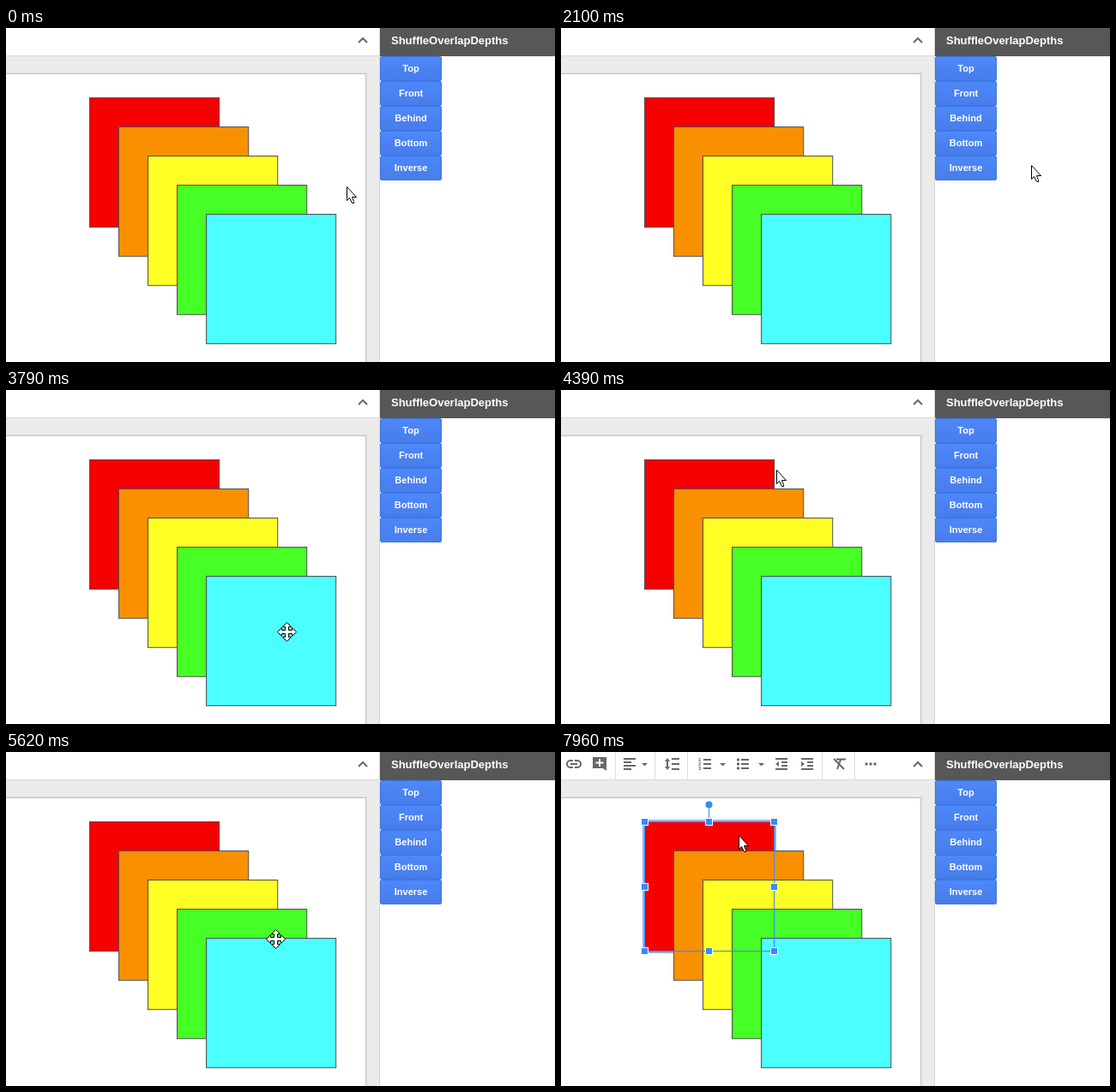
Recreate the animation shown at these times as an HTML page. Size 640 px wide and 390 px high, loop 8 s.

```html
<!DOCTYPE html>
<html lang="en">
<head>
<meta charset="utf-8">
<title>Stacking order panel</title>
<style>
  html, body { margin: 0; width: 100%; height: 100%; overflow: hidden; background: #fff; }
  svg { display: block; width: 640px; height: 390px; font-family: "Liberation Sans", Arial, sans-serif; font-weight: bold; }
  .icon { fill: none; stroke: #686868; stroke-width: 2; }
  .solid { fill: #686868; }
  .digits { font-size: 6px; fill: #686868; }
  .button rect { fill: url(#blue); stroke: #3d78e6; }
  .button.hover rect { fill: url(#blueHover); stroke: #2f5bb7; }
  .button text { font-size: 11px; fill: #fff; text-anchor: middle; }
  .cursor path { fill: #fff; stroke: #000; }
</style>
</head>
<body>
<svg viewBox="0 0 640 390">
  <defs>
    <linearGradient id="blue" x2="0" y2="1"><stop stop-color="#4d88fa"/><stop offset="1" stop-color="#487cea"/></linearGradient>
    <linearGradient id="blueHover" x2="0" y2="1"><stop stop-color="#4d86f7"/><stop offset="1" stop-color="#3570de"/></linearGradient>
  </defs>

  <rect width="640" height="390" fill="#fff"/>
  <rect y="33" width="435" height="357" fill="#ebebeb"/>
  <path d="M0 32.5H435" stroke="#d8d8d8"/>
  <rect x="-5" y="52.5" width="426" height="345" fill="none" stroke="#dedede"/>
  <rect x="-5" y="53.5" width="424.5" height="345" fill="#fff" stroke="#c4c4c4"/>
  <path class="icon" d="M411 17 416 12 421 17"/>

  <g id="toolbar"></g>
  <g id="squares"></g>
  <g id="selection" fill="#378bf7"></g>

  <path d="M435.500 0V390" stroke="#d6d6d6"/>
  <rect x="436" width="204" height="33" fill="#575757"/>
  <text x="449" y="19" font-size="13" fill="#fff">ShuffleOverlapDepths</text>
  <g id="buttons"></g>

  <g class="cursor">
    <path id="arrow" d="M0 0V16L3 13 6 19H8V17L6 12H11Z"/>
    <path id="move" d="M0-11 5-6H2V-2H6V-5L11 0 6 5V2H2V6H5L0 11-5 6H-2V2H-6V5L-11 0-6-5V-2H-2V-6H-5Z"/>
    <path id="hand" d="M-2 1Q0-1 2 1V6Q8 6 10 9V15L8 21H-1L-6 12-4 10-2 12Z"/>
  </g>
</svg>
<script>
const LOOP = 8000, FIRST_MOVE = 670, TICK = 77.34;
const SELECT_TICK = 86, TOOLBAR_TICK = 87, RELEASE_TICK = 90;
const SIZE = 151.2, STEP = 34, BUTTON_STEP = 29;
const colors = ["#f60000", "#f89000", "#ffff24", "#46ff24", "#4cffff"];
const labels = ["Top", "Front", "Behind", "Bottom", "Inverse"];

const byId = id => document.getElementById(id);
const show = (id, on) => byId(id).style.display = on ? "" : "none";
const repeat = (items, template) => items.map(template).join("");
const corner = i => ({ x: 97.5 + i * STEP, y: 81.5 + i * STEP });

// Toolbar pieces
const lines = (x, y, step, ...widths) => `<path class="icon" d="${repeat(widths, (w, i) => `M${x} ${y + i * step}h${w}`)}"/>`;
const stroke = d => `<path class="icon" d="${d}"/>`;
const solid = d => `<path class="solid" d="${d}"/>`;
const caret = x => solid(`M${x} 13h7l-3.5 3.5z`);
const dot = (x, y) => `<circle class="solid" cx="${x}" cy="${y}" r="1.7"/>`;
const indent = (x, arrow) => lines(x, 8, 12, 14, 14) + lines(x + 7, 12, 4, 7, 7) + solid(arrow);

byId("toolbar").innerHTML =
  repeat([63, 109, 147, 304, 342], x => `<path d="M${x}.5 0V32" stroke="#dcdcdc"/>`) +
  stroke("M14 10H11a4 4 0 0 0 0 8h3M16 10h3a4 4 0 0 1 0 8h-3M11 14h8") +
  solid("M37 6H53V22L49 19H37Z") +
  `<path d="M45 8v9M40.5 12.5h9" stroke="#fff" stroke-width="2"/>` +
  lines(73, 8, 4, 14, 9, 14, 9) +
  lines(129, 8, 6, 9, 9, 9) + stroke("M124 9V19") + solid("M121 11l3-4 3 4zM121 17l3 4 3-4z") +
  lines(166, 9, 5, 9, 9, 9) +
  repeat([1, 2, 3], n => `<text class="digits" x="160" y="${6 + 5 * n}">${n}</text>`) +
  lines(210, 9, 5, 9, 9, 9) + repeat([9, 14, 19], y => dot(206.5, y)) +
  repeat([94, 185, 230], caret) +
  indent(250, "M254 11v6l-4-3z") + indent(280, "M280 11v6l4-3z") +
  stroke("M321 8.5h11M326 9l-4 11M318 8l12 12") +
  repeat([356, 361, 366], x => dot(x, 14));

byId("squares").innerHTML =
  `<rect id="halo" x="97" y="81" width="152" height="152" fill="none" stroke="#8db9f7" stroke-width="4"/>` +
  repeat(colors, (color, i) => {
    const { x, y } = corner(i);
    return `<rect x="${x}" y="${y}" width="${SIZE}" height="${SIZE}" fill="${color}" stroke="#505050"/>`;
  });

byId("selection").innerHTML =
  `<path d="M97.5 81.5h151v151h-151zM172.5 62v19" fill="none" stroke="#378bf7"/>
   <circle cx="172.5" cy="61.5" r="4"/>` +
  repeat([77.5, 153.5, 228.5], (y, row) => repeat([93.5, 168.5, 244.5], (x, col) =>
    row === 1 && col === 1 ? "" : `<rect x="${x}" y="${y}" width="8" height="8" stroke="#fff"/>`));

byId("buttons").innerHTML = repeat(labels, (label, i) =>
  `<g class="button" transform="translate(436 ${33 + BUTTON_STEP * i})">
   <rect x=".5" y=".5" width="71" height="28" rx="1.5"/><text x="36" y="18">${label}</text></g>`);
const buttons = [...document.querySelectorAll(".button")];

// The pointer circles the panel, then the squares, and finally picks the first square.
const lerp = (a, b, u) => a + (b - a) * u;
const glide = (from, to) => u => {
  const eased = u * u * (3 - 2 * u);
  return from.map((start, axis) => lerp(start, to[axis], eased));
};
const orbit = (center, radius, startDeg, endDeg) => u => {
  const angle = lerp(startDeg, endDeg, u) * Math.PI / 180;
  return [center[0] + radius[0] * Math.cos(angle), center[1] + radius[1] * Math.sin(angle)];
};
const stage = (start, end, at) => ({ start, end, at });
const route = [
  stage(-1, 4, glide([397, 185], [493, 189])),
  stage(6, 16, orbit([473, 98], [68, 90], 98, 350)),
  stage(17, 27, orbit([495, 115], [64, 82], 10, 243)),
  stage(28, 33, orbit([482, 113], [46, 80], 275, 432)),
  stage(34, 40, glide([496, 188], [327, 282])),
  stage(41, 45, orbit([290, 176], [143, 110], 98, 188)),
  stage(46, 56, orbit([230, 193], [92, 103], 222, 528)),
  stage(57, 64, orbit([233, 170], [97, 88], 198, 393)),
  stage(64, 67, glide([314, 218], [276, 258])),
  stage(72, 82, glide([277, 260], [189, 96])),
  stage(89, 94, glide([189, 96], [207, 97]))
];

function pointerAt(tick) {
  const { start, end, at } = route.findLast(s => s.start <= tick) || route[0];
  const u = Math.min(1, Math.max(0, (tick - start) / (end - start)));
  return at(u).map(Math.round);
}

function draw(now) {
  const tick = Math.floor((now % LOOP - FIRST_MOVE) / TICK);
  const [x, y] = pointerAt(tick);
  const hovered = x >= 436 && x < 508 ? Math.floor((y - 33) / BUTTON_STEP) : -1;
  const onSquare = colors.some((_, i) => {
    const c = corner(i);
    return x >= c.x && x <= c.x + SIZE && y >= c.y && y <= c.y + SIZE;
  });
  const cursor = labels[hovered] ? "hand" : onSquare && tick < RELEASE_TICK ? "move" : "arrow";

  for (const id of ["arrow", "move", "hand"]) show(id, id === cursor);
  byId(cursor).setAttribute("transform", `translate(${x + .5} ${y + .5})`);
  buttons.forEach((button, i) => button.classList.toggle("hover", i === hovered));
  show("halo", tick >= SELECT_TICK);
  show("selection", tick >= SELECT_TICK);
  show("toolbar", tick >= TOOLBAR_TICK);
}

function frame() {
  draw(performance.now());
  requestAnimationFrame(frame);
}
frame();
</script>
</body>
</html>
```
